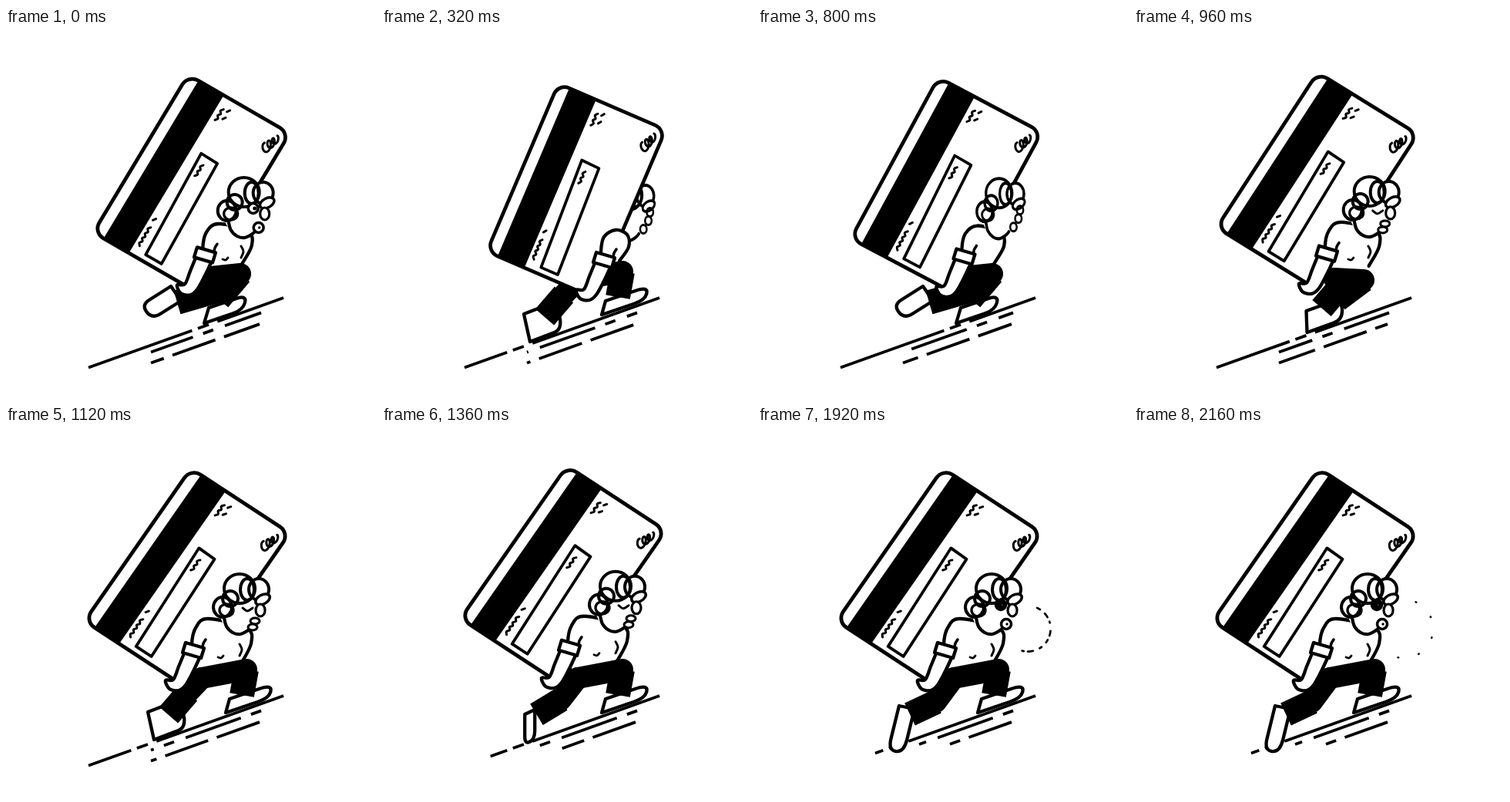
Animation of 480x480 px, one loop 2240 ms. Source, as an HTML page with a canvas:

```html
<!DOCTYPE html>
<html lang="en">
<head>
<meta charset="utf-8">
<title>Carrying a card uphill</title>
<style>
html, body { margin: 0; width: 100%; height: 100%; overflow: hidden; background: #fff; }
canvas { display: block; width: 100vw; height: 100vh; }
</style>
</head>
<body>
<canvas id="stage" width="480" height="480"></canvas>
<script>
const ctx = document.getElementById('stage').getContext('2d');
const STEP = 80, COUNT = 28;
const HALT = 14;        // the walk ends here, then he catches his breath
const STRIDE = 5;       // time from one passing pose to the next
const SCROLL = 21;      // ground speed

// Leg pose: knee, ankle, heel, then the sole and height vectors of the shoe.
const pose = {
  planted: [304,319, 276,352, 257,383, 50,-17, 6,-20],
  back: [236,346, 211,375, 192,407, 42,-16, -8,-36],
  lifted: [284,338, 222,356, 214,335, -38,24, 13,19],
  front: [312,316, 306,349, 285,372, 56,-19, 5,-18],
  push: [231,358, 197,374, 183,363, -14,57, 20,4]
};
const gait = [[0, pose.planted], [4, pose.back], [5, pose.lifted], [9, pose.front], [10, pose.planted]];

// Upper body, upright and straining under the load.
const upright = {
  card: [240,55, 368,139, 102,253],   // top left, top right, bottom left
  torso: [244,318, 241,284, 246,262, 262,250, 312,262, 318,282, 304,310],
  arm: [-14,-2], head: [0,0]
};
const strained = {
  card: [229,72, 368,132, 136,290],
  torso: [286,306, 284,290, 288,271, 303,262, 318,268, 320,284, 308,302],
  arm: [31,8], head: [17,6]
};

const rows = [
  { y: 350, right: 360, walkLeft: 107, restLeft: 152, dash: [175, 12, 15, 8] },
  { y: 359, right: 331, walkLeft: 188, restLeft: 209, dash: [14, 14, 76, 16] },
  { y: 373, right: 329, walkLeft: 188, restLeft: 249, dash: [59, 12] }
];

const clamp = v => Math.max(0, Math.min(1, v));
const lerp = (a, b, p) => a + (b - a) * p;
const mix = (a, b, p) => a.map((v, i) => lerp(v, b[i], p));

function footAt(phase) {
  const i = gait.findIndex(k => k[0] > phase);
  const [t0, a] = gait[i - 1], [t1, b] = gait[i];
  return mix(a, b, (phase - t0) / (t1 - t0));
}

// Smooth open path through flat x,y points.
function curve(pts) {
  const n = pts.length / 2;
  const at = i => {
    i = Math.max(0, Math.min(n - 1, i));
    return [pts[2 * i], pts[2 * i + 1]];
  };
  ctx.beginPath();
  ctx.moveTo(...at(0));
  for (let i = 0; i < n - 1; i++) {
    const [a, b, c, d] = [at(i - 1), at(i), at(i + 1), at(i + 2)];
    ctx.bezierCurveTo(b[0] + (c[0] - a[0]) / 6, b[1] + (c[1] - a[1]) / 6,
      c[0] - (d[0] - b[0]) / 6, c[1] - (d[1] - b[1]) / 6, c[0], c[1]);
  }
}

function poly(pts, closed) {
  ctx.beginPath();
  for (let i = 0; i < pts.length; i += 2) ctx.lineTo(pts[i], pts[i + 1]);
  if (closed) ctx.closePath();
}

function ink(width, fill) {
  if (fill) { ctx.fillStyle = fill; ctx.fill(); }
  ctx.lineWidth = width;
  ctx.stroke();
}

function oval(x, y, rx, ry, width = 4, fill, tilt = 0) {
  ctx.beginPath();
  ctx.ellipse(x, y, rx, ry, tilt, 0, 7);
  ink(width, fill);
}

function zigzag(u, v0, v1) {
  const pts = [];
  for (let v = v0, side = 1; v <= v1; v += 3.5, side = -side) pts.push(u + side * 1.3, v);
  curve(pts);
  ink(3);
}

function drawCard([x, y, rx, ry, bx, by]) {
  const w = 154, h = 239;
  ctx.save();
  ctx.transform((rx - x) / w, (ry - y) / w, (bx - x) / h, (by - y) / h, x, y);
  ctx.beginPath();
  ctx.roundRect(0, 0, w, h, 15);
  ink(4.8, '#fff');
  ctx.fillStyle = '#000';
  ctx.fillRect(15.5, 0, 38.5, h);
  poly([68,80, 93,81, 98,230, 74,230], true);
  ink(3.8, '#fff');
  zigzag(62, 16, 36);
  zigzag(70, 13, 18);
  zigzag(70, 24, 28);
  zigzag(77, 92, 111);
  zigzag(60, 183, 188);
  zigzag(60, 196, 226);
  const scrawl = [];
  for (let i = 0; i <= 30; i++) {
    const p = i / 30, a = p * 6 * Math.PI, size = 1 - .45 * p;
    scrawl.push(136 + 8 * p + size * (-4 * Math.cos(a) - 3 * Math.sin(a)),
      33 - 19 * p + size * (-6 * Math.cos(a) + 3 * Math.sin(a)));
  }
  curve(scrawl);
  ink(3);
  ctx.restore();
}

function drawShoe(x, y, sx, sy, ux, uy) {
  ctx.save();
  ctx.transform(sx, sy, ux, uy, x, y);
  ctx.beginPath();
  ctx.moveTo(0, 0);
  ctx.lineTo(.75, 0);
  ctx.quadraticCurveTo(1, 0, 1, .45);
  ctx.quadraticCurveTo(1, 1, .7, 1);
  ctx.lineTo(0, 1);
  ctx.closePath();
  ctx.restore();
  ink(4.3, '#fff');
}

function drawLeg(hip, leg) {
  const knee = leg.slice(0, 2), ankle = leg.slice(2, 4);
  drawShoe(...leg.slice(4));
  poly([...hip, ...knee]);
  ink(28);
  ctx.lineCap = 'butt';
  poly([...knee, ...ankle]);
  ink(32);
  ctx.lineCap = 'round';
}

function drawTorso(pts, strain) {
  curve(pts);
  ink(4.3, '#fff');
  if (strain > .4) return;
  const dx = 18 * strain;
  curve([275 + dx,300, 279 + dx,301, 282 + dx,298]);
  ink(2.8);
  curve([303 + dx / 3,283, 306 + dx / 3,290, 303 + dx / 3,298]);
  ink(3);
}

function drawArm([dx, dy]) {
  ctx.save();
  ctx.translate(dx, dy);
  curve([245,297, 238,314, 231,331, 221,332, 226,343, 238,345, 247,338, 257,320, 265,303]);
  ink(4.3, '#fff');
  poly([247,283, 271,290, 267,303, 243,296], true);
  ink(4.3, '#fff');
  curve([269,289, 270,284, 273,279]);
  ink(3.5);
  ctx.restore();
}

function drawFace(look) {
  if (look === 'away') {
    for (let i = 0; i < 3; i++) oval(335 - i * i * 2.5, 233 + 11 * i, 5, 5.5, 3);
    return;
  }
  oval(330, 239, 6, 8, 3.2, '#fff');
  if (look === 'shut') {
    curve([307,236, 313,240, 320,236]);
    ink(3);
    oval(323, 253, 6, 4, 3, '#fff');
    oval(320, 261, 6, 4, 3, '#fff');
  } else {
    const blowing = look === 'blow';
    oval(315, 232, 6.5, 6.5, 3.5, blowing ? '#000' : '#fff');
    oval(317, 232, 1.5, 1.5, 2, blowing ? '#fff' : '#000');
    oval(322, 257, 6.5, 6.5, 3.5, '#fff');
    oval(323, 257, .7, .7, 2, '#000');
  }
}

function drawHead([dx, dy], look) {
  ctx.save();
  ctx.translate(306 + dx, dy);
  ctx.scale(look === 'away' ? .85 : 1, 1);
  ctx.translate(-306, 0);
  const curls = [[303,211,20,19], [328,212,13,14], [291,224,10,10], [281,235,12,13]];
  ctx.fillStyle = '#fff';
  for (const c of [...curls, [304,236,28,33], [322,240,13,20]]) {
    ctx.beginPath();
    ctx.ellipse(...c, 0, 0, 7);
    ctx.fill();
  }
  curve([283,249, 286,260, 294,268, 304,270, 314,265, 318,261]);
  ink(4.2);
  for (const c of curls) oval(...c);
  oval(313, 212, 9, 14);
  oval(286, 239, 9, 8, 3.3);
  oval(333, 225, 10, 6, 3.5, '#fff', -.5);
  drawFace(look);
  ctx.restore();
}

function drawGround(f) {
  const rest = clamp((f - HALT) / 4);
  ctx.lineDashOffset = SCROLL * Math.max(0, HALT - f);
  ctx.lineCap = 'butt';
  for (const r of rows) {
    const left = lerp(r.walkLeft, r.restLeft, rest), y = x => r.y + .358 * (360 - x);
    ctx.setLineDash(r.dash);
    poly([r.right, y(r.right), left, y(left)]);
    ink(3.8);
  }
  ctx.setLineDash([]);
  ctx.lineCap = 'round';
}

function drawPuff(f) {
  const age = f - 17;
  if (age < 1) return;
  if (age < 5) {
    const grow = clamp(age / 3), r = 17 * grow;
    const cx = 328 + 28 * grow, cy = 257 + 5 * grow;
    for (let i = 0; i < 6; i++) {
      const a = -1.75 + i * .68;
      ctx.beginPath();
      ctx.arc(cx + r * .75 * Math.cos(a), cy + r * 1.03 * Math.sin(a), r * .4, a - 1.35, a + 1.35);
      ink(3.5);
    }
    for (const side of [0, 1]) {
      poly([335 + 3 * side, 265 + 3 * side, 347, 259 + 7 * side]);
      ink(3);
    }
    return;
  }
  // the cloud breaks into drifting dashes, then dots
  const p = (age - 5) / 5, n = 15 - age;
  for (let i = 0; i < n; i++) {
    const a = -1.15 + i * 2.9 / (n - 1);
    const len = .36 * (1 - p) * (.6 + .4 * Math.sin(i * 2.4)) + .02;
    ctx.beginPath();
    ctx.arc(350, 263, 24 + 14 * p, a, a + len);
    ink(2.8 - .3 * p);
  }
}

function draw(now) {
  const f = Math.floor(now / STEP) % COUNT, walk = Math.min(f, HALT);
  const swell = (1 + Math.cos(Math.PI * (walk - 5.5) / 8.5)) / 2;
  const strain = Math.min(1, 1.2 * swell);
  const breath = -4 * Math.sin(Math.PI * clamp((f - HALT) / 10));
  const body = part => mix(upright[part], strained[part], strain);

  const passing = Math.max(0, 1 - walk % STRIDE / 4);
  const hip = [254 + 12 * passing, 327 - 4 * passing];
  const near = footAt(walk % 10), far = footAt((walk + STRIDE) % 10);
  const rear = mix(near, pose.push, clamp((f - HALT) / 4));
  const look = strain > .45 ? 'away' : f < 12 ? 'open' : f < 18 ? 'shut' : 'blow';

  ctx.fillStyle = '#fff';
  ctx.fillRect(0, 0, 480, 480);
  ctx.strokeStyle = '#000';
  ctx.lineCap = ctx.lineJoin = 'round';
  drawGround(f);

  const parts = {
    card: () => drawCard(body('card')),
    torso: () => drawTorso(body('torso'), strain),
    legs: () => { drawLeg(hip, far); drawLeg(hip, rear); },
    head: () => drawHead(body('head'), look),
    arm: () => drawArm(body('arm'))
  };
  const order = strain > .8 ? 'legs head card torso arm' : 'card torso legs head arm';
  for (const name of order.split(' ')) {
    ctx.save();
    if (name !== 'legs') ctx.translate(0, breath);
    parts[name]();
    ctx.restore();
  }
  drawPuff(f);
}

const start = performance.now();
function tick() {
  draw(performance.now() - start);
  requestAnimationFrame(tick);
}
tick();
</script>
</body>
</html>
```
